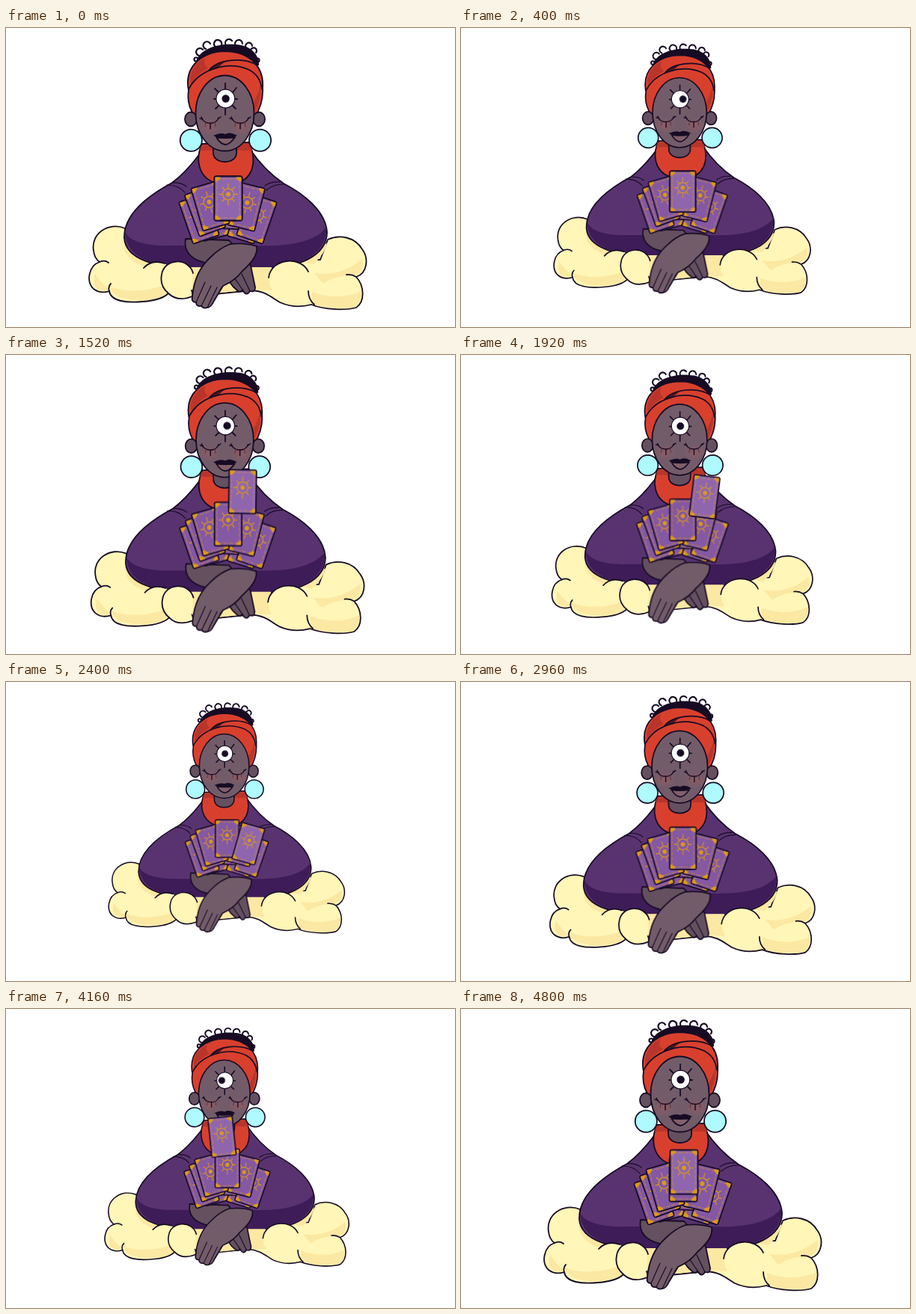
Recreate the animation shown at these times as an HTML page without scripts. Size 600x400 px, loop 4.88 s.

```html
<!DOCTYPE html>
<html lang="en">
<head>
<meta charset="utf-8">
<title>Fortune teller</title>
<style>
  @property --size { syntax: "<number>"; inherits: false; initial-value: 1; }
  html, body { margin: 0; width: 100%; height: 100%; overflow: hidden; background: #fff; }
  svg { display: block; width: 100vw; height: 100vh; }
  .ink { stroke: #170b24; stroke-width: 1.8; stroke-linejoin: round; stroke-linecap: round; }
  .line { fill: none; }
  .thin { stroke-width: 1.2; }
  .cloud { fill: #fff6b8; }
  .cream { fill: #fbe8a2; }
  .robe { fill: #593370; }
  .red { fill: #d8402d; }
  .dark-red { fill: #b9352b; }
  .skin { fill: #735c69; }
  .shade { fill: #655060; }
  .gold { fill: none; stroke: #dc9a18; stroke-width: 1.1; }

  #figure { transform-origin: 286.5px 104px; transform: scale(var(--size)); animation: breathe 4880ms infinite steps(10); }
  #pupil { animation: glance 4880ms infinite linear; }
  #drawn { --card: #8f66ae; animation: draw 4880ms infinite linear; }

  @keyframes breathe {
    0%, 32.787%, 65.574%, 98.361%, 100% { --size: 1; }
    16.393%, 49.18%, 81.967% { --size: .851; }
  }
  @keyframes glance {
    0%, 4%, 34%, 69%, 97%, 100% { transform: translateX(0); }
    14%, 21% { transform: translateX(9px); }
    31.15% { transform: translateX(2px); }
    78%, 87% { transform: translateX(-5px); }
  }
  @keyframes draw {
    0%, 16.39% { transform: translate(297px, 228px) rotate(0deg); }
    22.95% { transform: translate(305px, 197px) rotate(0deg); }
    31.15% { transform: translate(316.5px, 184px) rotate(1deg); }
    39.34% { transform: translate(328px, 195px) rotate(7deg); }
    49.18% { transform: translate(330.5px, 236px) rotate(16deg); opacity: 1; }
    53.5% { transform: translate(322px, 239px) rotate(14deg); opacity: 1; }
    53.51% { transform: translate(322px, 239px) rotate(14deg); opacity: 0; }
    65.56% { transform: translate(273px, 238px) rotate(-16deg); opacity: 0; }
    65.57% { transform: translate(273px, 238px) rotate(-16deg); opacity: 1; }
    70.49% { transform: translate(276.5px, 218px) rotate(-14.5deg); }
    78.69% { transform: translate(280px, 189px) rotate(-11deg); }
    85.25% { transform: translate(289px, 180px) rotate(-6deg); }
    91.8% { transform: translate(295px, 191px) rotate(-2deg); }
    98.36% { transform: translate(298px, 218px) rotate(0deg); }
    100% { transform: translate(297px, 228px) rotate(0deg); }
  }
</style>
</head>
<body>
<svg viewBox="0 0 600 400">
  <defs>
    <radialGradient id="blush">
      <stop stop-color="#a85a60" stop-opacity=".5"/>
      <stop offset="1" stop-color="#a85a60" stop-opacity="0"/>
    </radialGradient>
    <path id="corner" d="M-17.5-28.5h7q-1 5-7 6z" fill="#dc9a18"/>
    <g id="ray"><path d="M0-7.5V-12.5"/><path d="M5.3-5.3l3-3"/></g>
    <g id="card">
      <rect class="ink" x="-18.5" y="-29.5" width="37" height="59" rx="2.5" style="fill:var(--card, #8458a3)"/>
      <rect class="gold" x="-15" y="-26" width="30" height="52" stroke-dasharray="6 1.5" style="stroke-width:.6"/>
      <use href="#corner"/>
      <use href="#corner" transform="scale(-1 1)"/>
      <use href="#corner" transform="scale(1 -1)"/>
      <use href="#corner" transform="scale(-1)"/>
      <g class="gold" transform="translate(0 -5.5) scale(1 1.18)">
        <ellipse rx="7.5" ry="6.4"/>
        <ellipse rx="2.4" ry="2" fill="#dc9a18"/>
        <use href="#ray"/>
        <use href="#ray" transform="rotate(90)"/>
        <use href="#ray" transform="rotate(180)"/>
        <use href="#ray" transform="rotate(270)"/>
      </g>
    </g>
    <g id="lid" class="ink line" style="stroke-width:1.5">
      <path d="M-12-7C-9 4 8 4 11-6M0 1v8M-10-4l-4-1M10-4l4-3"/>
      <path d="M-6 0l-1 6M6 0l1 6" stroke="#5c2f3c" stroke-width="1"/>
    </g>
  </defs>

  <g id="figure">
    <!-- cloud -->
    <path class="ink cloud" d="M159 268C137 259 113 275 117 298Q118 308 125 313C110 318 107 340 117 349Q126 356 138 352C140 366 162 368 183 366Q208 364 217 355Q229 367 249 359L328 351C347 352 354 360 366 367Q386 376 408 370C425 377 455 378 468 374C480 366 479 345 468 333C483 328 485 308 476 296C466 279 445 276 430 283L420 310H170Z"/>
    <path class="cream" d="M160 279C154 296 160 309 184 319L240 318V300H165ZM429 288Q426 302 411 316L385 311L340 322V302H400ZM119 329Q115 341 121 348Q130 354 137 349Q127 341 119 329ZM139 346Q172 358 212 344L216 354Q207 363 180 364Q142 364 139 346ZM409 353Q443 366 475 352Q475 371 462 374Q429 377 409 368ZM412 328Q448 333 476 309Q480 325 466 331Q440 330 424 342Z"/>

    <!-- robe -->
    <path class="ink robe" d="M262 164C247 185 234 198 222 207C194 222 157 247 158 281C160 311 203 320 246 321H345C389 321 429 306 429 273C427 244 396 221 371 208C352 195 338 180 326 162Z"/>
    <path d="M159 272C166 289 198 292 222 291H335C377 293 415 286 428 266C430 307 385 320 345 320H246C203 319 160 311 159 272Z" fill="#3d1c58"/>
    <path class="ink line thin" d="M215 210Q231 210 239 220M222 207Q234 206 241 212M371 209Q356 209 348 217M366 206Q354 205 346 211"/>
    <path class="ink red" d="M262 155C253 174 256 199 279 207H311C333 198 334 174 325 153Z"/>
    <path class="dark-red" d="M261 157L326 155L329 164H259Z"/>
    <path class="ink shade" d="M277 156V167C277 183 308 183 308 167V156Z"/>

    <!-- front puffs -->
    <path class="cream" d="M240 320H355V351L328 350L249 358Z"/>
    <path class="cloud" d="M184 322Q195 308 214 316L216 340H170ZM208 332C209 306 246 306 249 331V349Q226 357 209 344ZM351 334C354 306 396 304 408 330L410 352Q379 362 353 346Z"/>
    <path class="ink line" d="M138 352Q136 346 140 342M125 313Q132 310 137 314M184 321Q195 309 212 315M208 330C211 308 244 306 250 328M208 330Q205 345 217 355M249 359Q250 355 248 351M351 334C354 308 394 304 404 326M404 352Q404 363 412 370M468 333Q462 329 455 330"/>

    <!-- hair and wrap -->
    <path d="M254 45C258 28 284 20 306 22C326 22 339 36 338 50Z" fill="#170b24"/>
    <g class="ink line" style="stroke-width:2.2">
      <path d="M258 37A5 5 0 1 1 263 29M267 28A5 5 0 1 1 273 21M280 25A5 5 0 1 1 288 22M294 23A5 5 0 1 1 302 17M307 24A5 5 0 1 1 316 21M321 27A4.5 4.5 0 1 1 329 24M329 34A4 4 0 1 1 334 33"/>
      <circle cx="254" cy="42" r="2.5"/>
      <circle cx="336" cy="43" r="2.5"/>
    </g>
    <path class="ink red" d="M244 84C237 49 265 31 294 31C325 32 345 51 343 80Q344 101 333 118H252Q241 102 244 84Z"/>
    <path class="dark-red" d="M246 66Q251 46 267 40Q262 48 270 54Q257 60 247 75ZM332 113Q342 96 340 76Q336 92 330 100Z"/>
    <path d="M271 57Q280 46 297 43Q287 48 283 54Z" fill="#4d1722"/>
    <path class="ink line" d="M244 82C257 56 295 43 325 56Q340 64 342 82M271 57C282 42 317 38 336 50"/>

    <!-- head -->
    <ellipse class="ink shade" cx="247" cy="122" rx="8" ry="9.5"/>
    <ellipse class="ink shade" cx="338" cy="122" rx="8" ry="9.5"/>
    <ellipse class="ink skin" cx="292.5" cy="114" rx="39" ry="50.5"/>
    <ellipse cx="271" cy="132" rx="15" ry="11" fill="url(#blush)"/>
    <ellipse cx="315" cy="132" rx="15" ry="11" fill="url(#blush)"/>
    <use href="#lid" x="273" y="126"/>
    <use href="#lid" x="313" y="126"/>
    <path class="ink" d="M281 146Q293 148 306 146Q299 156 293 156Q286 155 281 146Z" fill="#80606a"/>
    <path d="M277 144Q287 139 293 142Q299 138 309 144Q300 148 293 147Q286 149 277 144Z" fill="#170b24"/>
    <g class="ink" fill="#aefaff">
      <circle cx="247.3" cy="150.3" r="14.6"/>
      <circle cx="339.5" cy="150.3" r="14.6"/>
    </g>

    <!-- third eye -->
    <path class="ink line" d="M293 74v10M293 106v10M278 95h4M305 95h4M279 81l5 5M308 80l-5 6M280 108l4-4M307 108l-4-4"/>
    <circle class="ink thin" cx="293.3" cy="94.5" r="12.4" fill="#fff"/>
    <circle id="pupil" cx="293.6" cy="94.5" r="5.2" fill="#170b24"/>

    <!-- crossed hands -->
    <path class="ink shade" d="M240 282C237 298 247 309 263 313L292 324Q297 342 309 351Q314 355 316 350Q321 360 326 352Q333 354 333 347L327 318Q307 294 298 284Z"/>
    <path class="ink line thin" d="M305 334l11 16M315 329l11 23"/>
    <path class="ink skin" d="M300 289Q320 287 335 292C337 304 327 315 316 325Q306 338 290 345L278 365Q274 374 269 374Q264 376 261 372Q254 373 254 367Q247 367 249 359C251 337 258 320 274 306Q286 294 300 289Z"/>
    <path class="ink line thin" d="M266 340l-12 27M274 345l-13 27M282 347l-13 27M290 345l-4 5"/>

    <!-- fan of cards -->
    <use href="#card" transform="translate(274 252) rotate(-15)"/>
    <use href="#card" transform="translate(322 255) rotate(17)"/>
    <use href="#card" transform="translate(296 239) rotate(2)"/>
    <use href="#card" transform="translate(258 255) rotate(-19)"/>
    <use href="#card" transform="translate(266 245) rotate(-20)"/>
    <use href="#card" transform="translate(335 255) rotate(19)"/>
    <use href="#card" transform="translate(321 239) rotate(14)"/>
    <use href="#card" transform="translate(273 238) rotate(-16)"/>
    <use href="#card" transform="translate(297 228)"/>
    <g id="drawn"><use href="#card"/></g>
  </g>
</svg>
</body>
</html>
```
